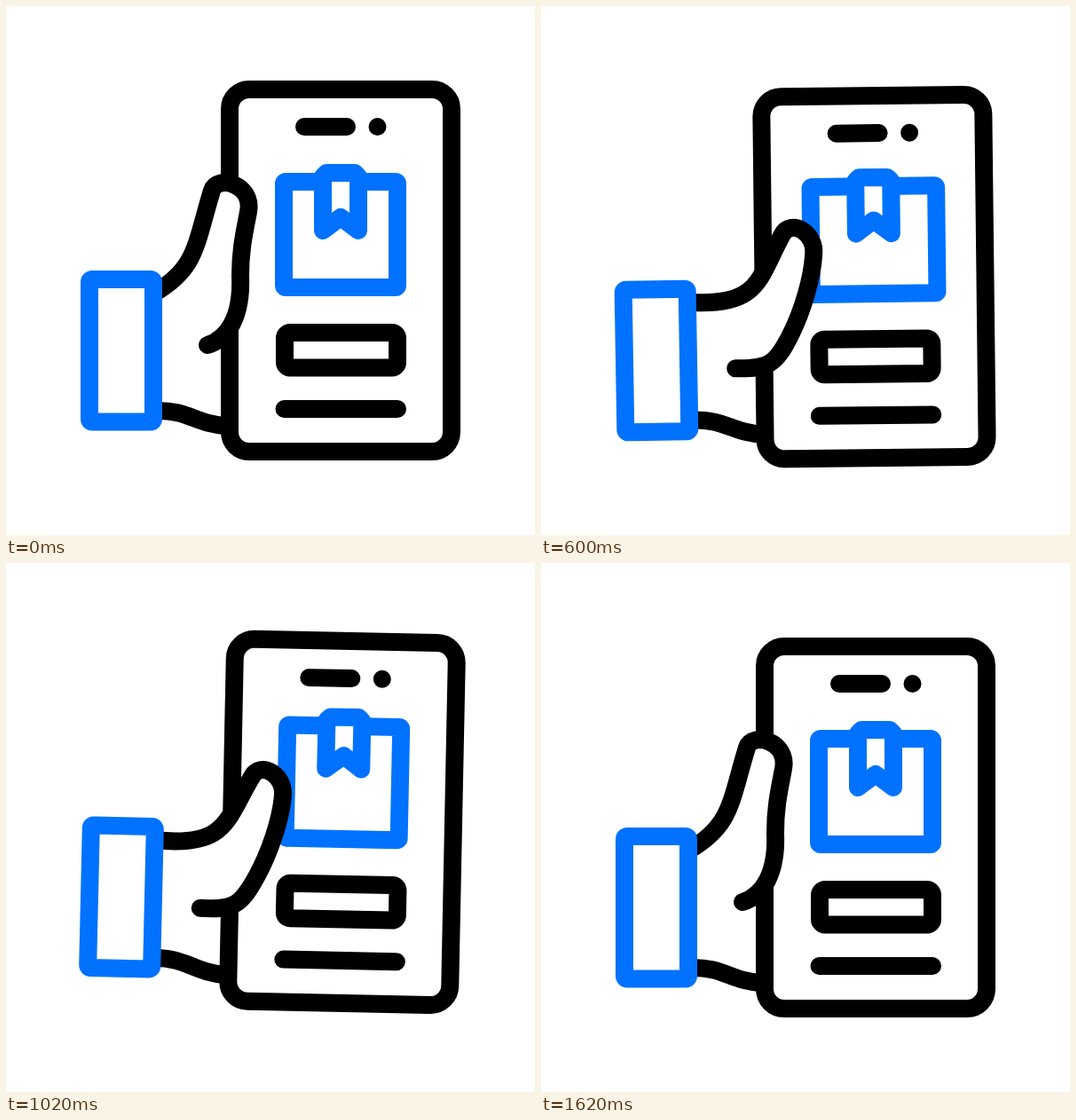
An HTML page with a canvas that plays this animation: 596 by 596 pixels, repeating every 1980 ms.

```html
<!DOCTYPE html>
<html>
<head>
<meta charset="utf-8">
<style>
  html, body { margin: 0; width: 100%; height: 100%; overflow: hidden; background: #fff; }
  canvas { display: block; width: 100vmin; height: 100vmin; }
</style>
</head>
<body>
<canvas id="stage" width="596" height="596"></canvas>
<script>
const ctx = document.getElementById('stage').getContext('2d');
const LOOP = 1980, STEP = 30, BEGIN = 150;
const BLACK = '#000', BLUE = '#0072ff';
const WRIST = { x: 130, y: 388 }, PHONE = { x: 377, y: 298 };

const mix = (a, b, u) => a + (b - a) * u;
const smooth = u => u * u * (3 - 2 * u);
const radians = degrees => degrees * Math.PI / 180;

// Rests at 0, then eases from one [time, value] turning point to the next.
function swing(t, ...turns) {
  let [t0, v0] = [BEGIN, 0];
  for (const [t1, v1] of turns) {
    if (t < t1) return mix(v0, v1, smooth(Math.max(0, (t - t0) / (t1 - t0))));
    [t0, v0] = [t1, v1];
  }
  return v0;
}

function turn(degrees, { x, y }) {
  ctx.translate(x, y);
  ctx.rotate(radians(degrees));
  ctx.translate(-x, -y);
}

function outline(color, path, filled) {
  if (filled) {
    ctx.fillStyle = '#fff';
    ctx.fill(path);
  }
  ctx.strokeStyle = color;
  ctx.stroke(path);
}

function box(color, x, y, w, h, r, filled) {
  const path = new Path2D();
  path.roundRect(x, y, w, h, r);
  outline(color, path, filled);
}

function drawParcel(squash, widen) {
  box(BLUE, 313 - widen / 2, 198 + squash, 128 + widen, 119 - squash, 2);
  // The ribbon hangs from the lid and stretches against it.
  const top = 188 + squash, tip = 253 + 1.8 * squash;
  outline(BLUE, new Path2D(
    `M357 ${tip}V${top + 4}l4 -4H393l4 4V${tip}l-20 -15Z`), true);
}

function drawPhone(squash, widen) {
  box(BLACK, 252, 94, 250, 408, 22);
  outline(BLACK, new Path2D('M336 136H384M418.5 136h.01M313.5 454H441'));
  box(BLACK, 314, 368, 127, 39.5, 6);
  drawParcel(squash, widen);
}

// Thumb outline: wrist, tip, side and palm, each one cubic curve.
const OPEN = [166,324, 215,296, 213,270, 232,208, 237,190, 279,200, 273,232,
  268,258, 264,275, 264,304, 266,350, 250,375, 227,382];
const CLOSED = [166,323, 248,330, 246,298, 274,249, 283,231, 313,246, 309,273,
  307,298, 296,334, 282,361, 265,394, 257,400, 219,398.5];

function drawHand(grip, phoneTurn) {
  const p = OPEN.map((v, i) => mix(v, CLOSED[i], grip));
  const thumb = new Path2D();
  thumb.moveTo(p[0], p[1]);
  for (let i = 2; i < p.length; i += 6) thumb.bezierCurveTo(...p.slice(i, i + 6));
  outline(BLACK, thumb, true);

  // The lower wrist line stays attached to the turning phone.
  const end = 251 - 175 * radians(phoneTurn);
  outline(BLACK, new Path2D(`M168 456C207 455 212 471 ${end} 473.5`));

  box(BLUE, 94, 308, 72, 160.5, 3, true);
}

function draw(t) {
  const drop = swing(t, [525, 13], [990, -12], [1380, 0]);
  const handTurn = swing(t, [420, 2.4], [765, -3.9], [1100, 2.2], [1500, 0]);
  const phoneTurn = swing(t, [480, 2.3], [790, -3.7], [1190, 2.1], [1590, 0]);
  const squash = swing(t, [365, 8.8], [850, -14], [1300, 4], [1600, 0]);
  const widen = swing(t, [400, 24], [840, 0]);
  const grip = swing(t, [480, 1], [1020, 1], [1460, 0]);

  ctx.fillStyle = '#fff';
  ctx.fillRect(0, 0, 596, 596);
  ctx.lineWidth = 20;
  ctx.lineCap = ctx.lineJoin = 'round';
  ctx.save();
  ctx.translate(0, drop);
  turn(handTurn, WRIST);
  ctx.save();
  turn(phoneTurn, PHONE);
  drawPhone(squash, widen);
  ctx.restore();
  drawHand(grip, phoneTurn);
  ctx.restore();
}

const start = performance.now();
function tick() {
  const t = (performance.now() - start) % LOOP;
  draw(Math.floor(t / STEP) * STEP);
  requestAnimationFrame(tick);
}
tick();
</script>
</body>
</html>
```
